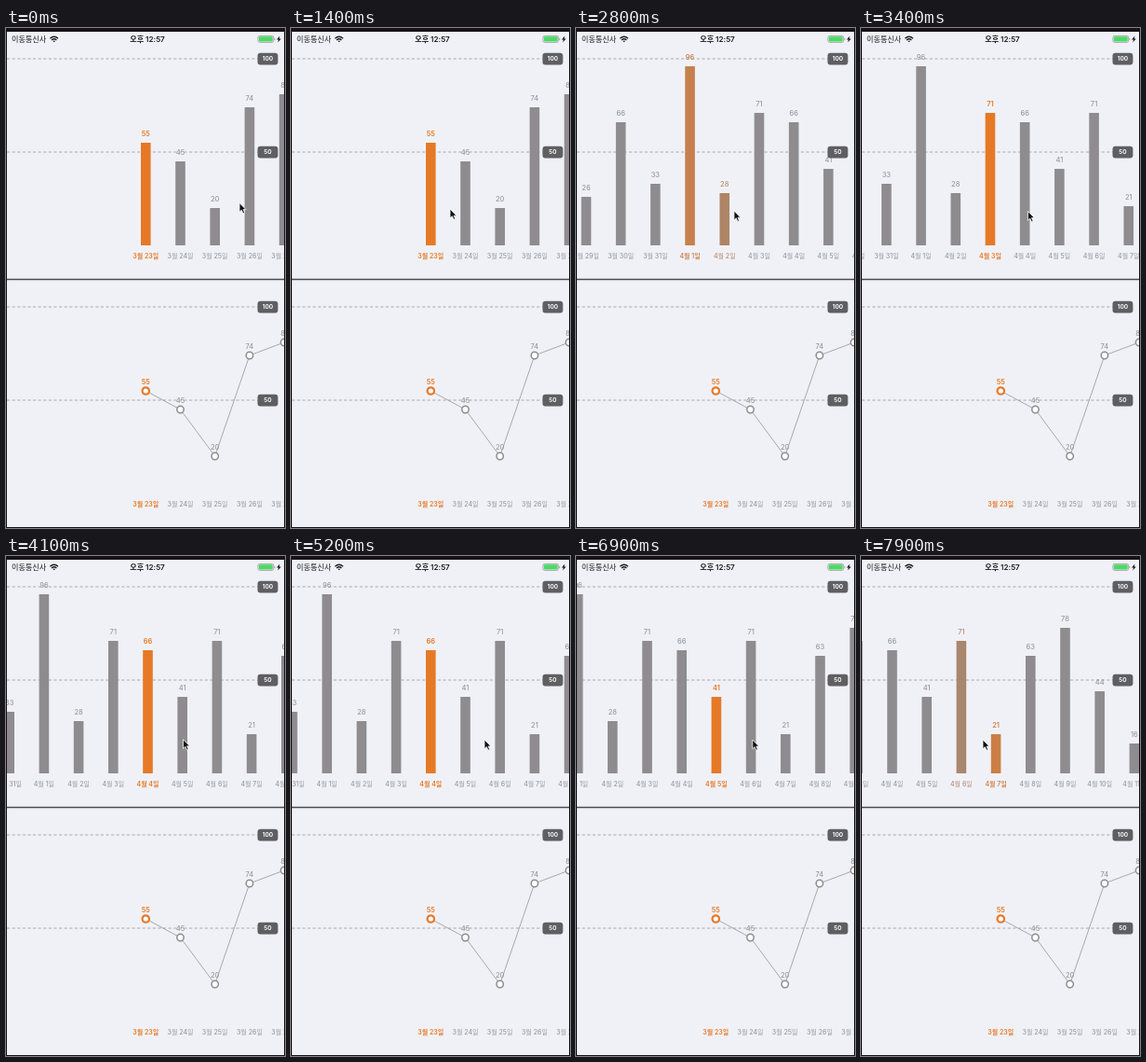
Write an HTML page that moves like this. It is 300 px wide and 536 px high and loops after 8000 ms.

```html
<!DOCTYPE html>
<html lang="ko">
<head>
<meta charset="utf-8">
<style>
html, body { margin: 0; width: 100%; height: 100%; overflow: hidden; background: #f0f1f7; }
svg { display: block; width: 300px; height: 536px; }
text { font: 500 7px Inter, "Noto Sans CJK KR", "Noto Sans CJK", sans-serif; text-anchor: middle; }
.value { font-size: 7.5px; }
.badge { font-size: 6.6px; font-weight: 600; fill: #fff; }
.status { font-size: 8.1px; fill: #1c1a1e; }
</style>
</head>
<body>
<svg viewBox="0 0 300 536">
  <rect width="300" height="536" fill="#f0f1f7"/>
  <g id="charts"></g>
  <path d="M0 269.4H300" stroke="#4c4a4f" stroke-width="1.5"/>
  <g id="status">
    <text class="status" x="6" y="14.8" style="text-anchor:start;font-weight:400">이동통신사</text>
    <text class="status" x="152" y="14.8" style="font-weight:600">오후 12:57</text>
    <g fill="none" stroke="#1c1a1e" stroke-width="1.3">
      <path d="M47.4 11.2Q51.7 7.2 56 11.2M49 13Q51.7 10.6 54.4 13"/>
      <path d="M50.4 13.9Q51.7 12.9 53 13.9L51.7 15.3Z" fill="#1c1a1e" stroke="none"/>
    </g>
    <rect x="270.9" y="8.4" width="16.8" height="7" rx="1.8" fill="none" stroke="#8c8a90" stroke-width=".7"/>
    <rect x="271.9" y="9.3" width="14.8" height="5.2" rx="1" fill="#4cd964"/>
    <path d="M288.4 10.7v2.4q1-.3 1-1.2t-1-1.2" fill="#8c8a90"/>
    <path d="M294.4 8.4l-3.4 4h2l-.8 3.2 3.6-4.2h-2z" fill="#1c1a1e"/>
  </g>
  <path d="M0 0H300V4H0ZM0 0H1V536H0ZM299 0H300V536H299ZM0 535H300V536H0Z" fill="#17121a"/>
  <path id="cursor" d="M0 0V9.8L2.3 7.7L3.9 11.3L5.6 10.5L4.1 7.1H7Z" fill="#111" stroke="#fff" stroke-width=".8" stroke-linejoin="round"/>
</svg>
<script>
const LOOP = 8000, TICK = 100, FADE = 180;
const STEP = 37.2, CENTER = 150.3, BASE = 233, LOWER = 266;
const GRAY = [142, 140, 142], TEXT_GRAY = [154, 153, 157], ORANGE = [230, 121, 38];
const values = [55, 45, 20, 74, 81, 93, 26, 66, 33, 96, 28, 71, 66, 41, 71, 21, 63, 78, 44, 16];

function make(parent, tag, attrs, content) {
  const el = document.createElementNS("http://www.w3.org/2000/svg", tag);
  for (const key in attrs) el.setAttribute(key, attrs[key]);
  if (content !== undefined) el.textContent = content;
  return parent.appendChild(el);
}

const mix = (a, b, k) => `rgb(${a.map((v, i) => Math.round(v + (b[i] - v) * k))})`;
const dateOf = i => i < 9 ? `3월 ${23 + i}일` : `4월 ${i - 8}일`;
const xOf = i => CENTER + i * STEP;
const yOf = v => BASE - 2 * v;

const progress = (t, from, to) => Math.min(1, Math.max(0, (t - from) / (to - from)));
const easeOut = u => 1 - (1 - u) ** 3;
const easeInOut = u => u * u * (3 - 2 * u);

// A long flick over twelve columns, a one-column drag, then an accelerating drag
const scrollAt = t => STEP * (
  12 * easeOut(progress(t, 1420, 4650)) +
  easeInOut(progress(t, 6300, 6950)) +
  2.14 * progress(t, 7150, 7900) ** 2
);

// Pointer: start, end and distance of each horizontal move
const moves = [
  [0, 500, -53], [1000, 1400, -27], [1400, 2300, -9], [2300, 5200, 46], [6000, 6200, 17], [6300, 7900, -94]
];
const pointerX = t => moves.reduce((x, [from, to, by]) => x + by * progress(t, from, to), 251);
const pointerY = t => 197 - 9.5 * Math.exp(-t / 1200);

// Share of the recent past in which each column was the centred one
function highlights(t) {
  const levels = values.map(() => 0), samples = 45;
  for (let k = 0; k < samples; k++) {
    levels[Math.round(scrollAt(t - FADE * k / samples) / STEP)] += 1 / samples;
  }
  return levels;
}

const charts = document.getElementById("charts");

function buildChart(top, drawMarks) {
  const root = make(charts, "g", { transform: `translate(0 ${top})` });
  for (const v of [100, 50]) {
    make(root, "path", {
      d: `M1 ${yOf(v)}H271`, stroke: "#aaa9ad", "stroke-width": 1.2, "stroke-dasharray": "3.2 2.4"
    });
  }
  const content = make(root, "g", {});
  const marks = drawMarks(content);
  const columns = values.map((v, i) => ({
    mark: marks[i],
    labels: [
      make(content, "text", { x: xOf(i), y: yOf(v) - 7.3, class: "value" }, v),
      make(content, "text", { x: xOf(i), y: BASE + 13.8 }, dateOf(i))
    ]
  }));
  for (const v of [100, 50]) {
    make(root, "rect", { x: 270.5, y: yOf(v) - 6.2, width: 21.9, height: 12.6, rx: 3, fill: "#5f5e63" });
    make(root, "text", { x: 281.4, y: yOf(v) + 2.4, class: "badge" }, v);
  }
  return { content, columns };
}

function paintLabels(column, level) {
  for (const label of column.labels) {
    label.style.fill = mix(TEXT_GRAY, ORANGE, level);
    label.style.fontWeight = level > .5 ? 600 : 500;
  }
}

const bars = buildChart(0, g => values.map((v, i) => make(g, "rect", {
  x: xOf(i) - 5.3, y: yOf(v), width: 10.6, height: 2 * v
})));

const lines = buildChart(LOWER, g => {
  make(g, "polyline", {
    points: values.map((v, i) => [xOf(i), yOf(v)]).join(" "),
    fill: "none", stroke: "#a09fa2", "stroke-width": .9
  });
  return values.map((v, i) => make(g, "circle", {
    cx: xOf(i), cy: yOf(v), r: 3.7, fill: "#fff",
    stroke: mix(GRAY, ORANGE, i ? 0 : 1), "stroke-width": i ? 1.5 : 2.2
  }));
});
lines.columns.forEach((column, i) => paintLabels(column, i ? 0 : 1));

const cursor = document.getElementById("cursor");

function render(t) {
  bars.content.setAttribute("transform", `translate(${-scrollAt(t)} 0)`);
  const levels = highlights(t);
  bars.columns.forEach((column, i) => {
    column.mark.setAttribute("fill", mix(GRAY, ORANGE, levels[i]));
    paintLabels(column, levels[i]);
  });
  cursor.setAttribute("transform", `translate(${pointerX(t)} ${pointerY(t)})`);
}

const start = performance.now();
function frame() {
  const t = (performance.now() - start) % LOOP;
  render(Math.floor(t / TICK) * TICK);
  requestAnimationFrame(frame);
}
frame();
</script>
</body>
</html>
```
